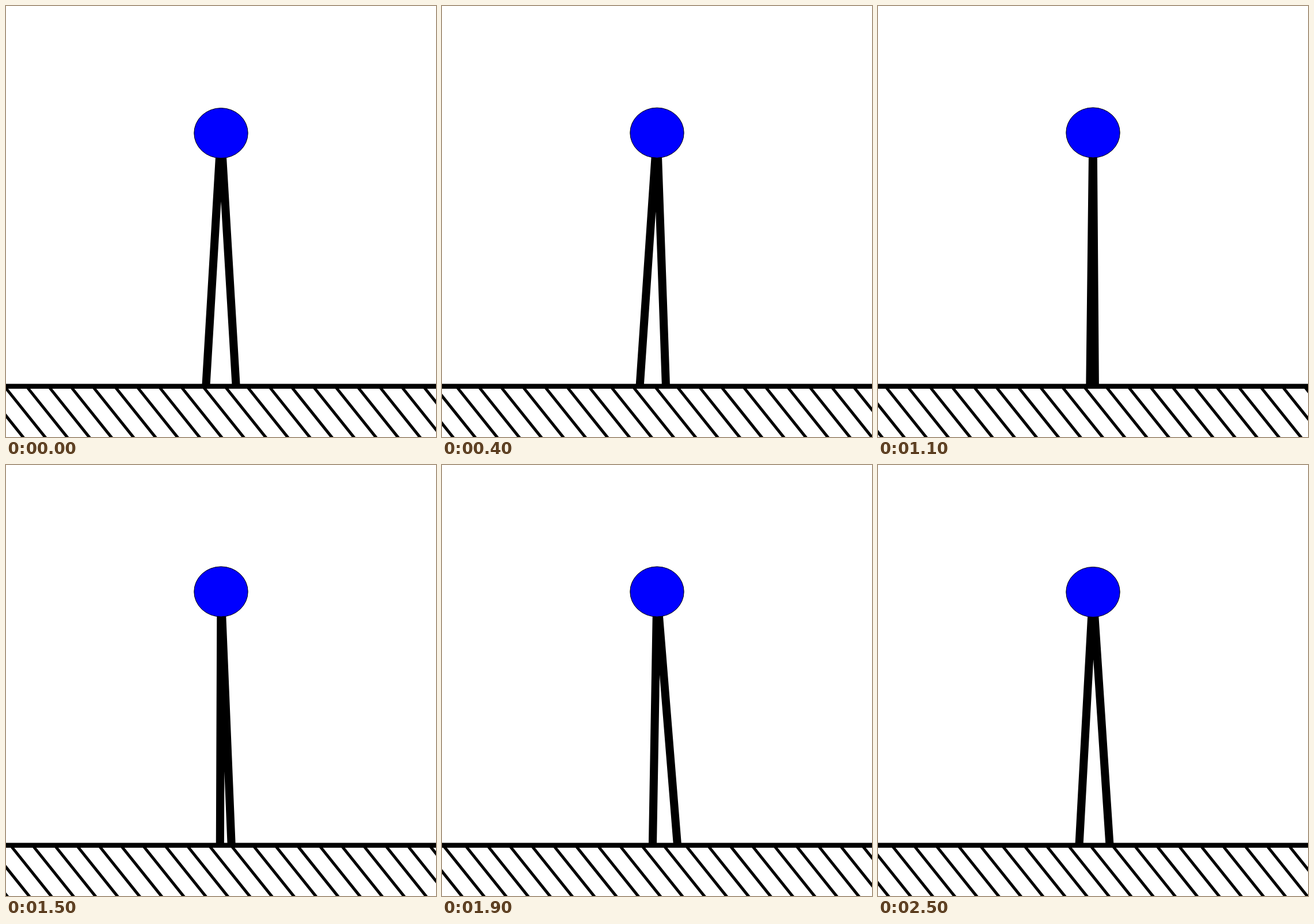
Write an HTML page that moves like this. It is 747x750 px and loops after 2600 ms.

```html
<!DOCTYPE html>
<html lang="en">
<head>
<meta charset="utf-8">
<title>Walker</title>
<style>
  html, body { margin: 0; width: 100%; height: 100%; overflow: hidden; background: #fff; }
  svg { display: block; width: 747px; height: 750px; }
  path { fill: none; stroke: #000; }
</style>
</head>
<body>
<svg viewBox="0 0 747 750">
  <path id="legs" stroke-width="14.1" stroke-linejoin="bevel"/>
  <path id="hatch" stroke-width="5.1"/>
  <path d="M0 661.7H747" stroke-width="8.6"/>
  <ellipse id="hip" cx="373.5" rx="46.7" ry="43.6" fill="#00f" stroke="#000"/>
</svg>
<script>
const LOOP = 2600, STEP = 100;
const HIP_X = 373.5, LEG = 440.6, GROUND = 661;
const GAP = 38.3, SLOPE = 0.8;
const HALF = 1.906; // half a stride, in pendulum time

const get = id => document.getElementById(id);
const legs = get('legs'), hatch = get('hatch'), hip = get('hip');

// Pendulum time from -HALF to HALF, starting a little slowly
const phase = step => HALF * (2 * (step / 25.5) ** 1.11 - 1);

// Foot offsets from the hip: inverted pendulum, and the hanging leg it drives
const stance = w => -7.92 * Math.sinh(w);
const swing = w => 42.17 * Math.sin(w) + 7.8 * Math.cos(w) - 4.2 * Math.sinh(w) + 2.6;

let lines = '';
for (let i = -2; i < 23; i++) {
  const x = 0.6 + i * GAP;
  lines += `M${x - 6 * SLOPE} 660L${x + 90 * SLOPE} 756`;
}
hatch.setAttribute('d', lines);

function draw(now) {
  const w = phase(Math.floor((now % LOOP) / STEP));
  const a = stance(w), b = swing(w);
  const hipY = GROUND - LEG * Math.cos(a / LEG);
  legs.setAttribute('d', `M${HIP_X + a} 659L${HIP_X} ${hipY}L${HIP_X + b} 659`);
  hip.setAttribute('cy', hipY);
  hatch.setAttribute('transform', `translate(${a - stance(-HALF)})`);
}

const start = performance.now();
function tick() {
  draw(performance.now() - start);
  requestAnimationFrame(tick);
}
tick();
</script>
</body>
</html>
```
